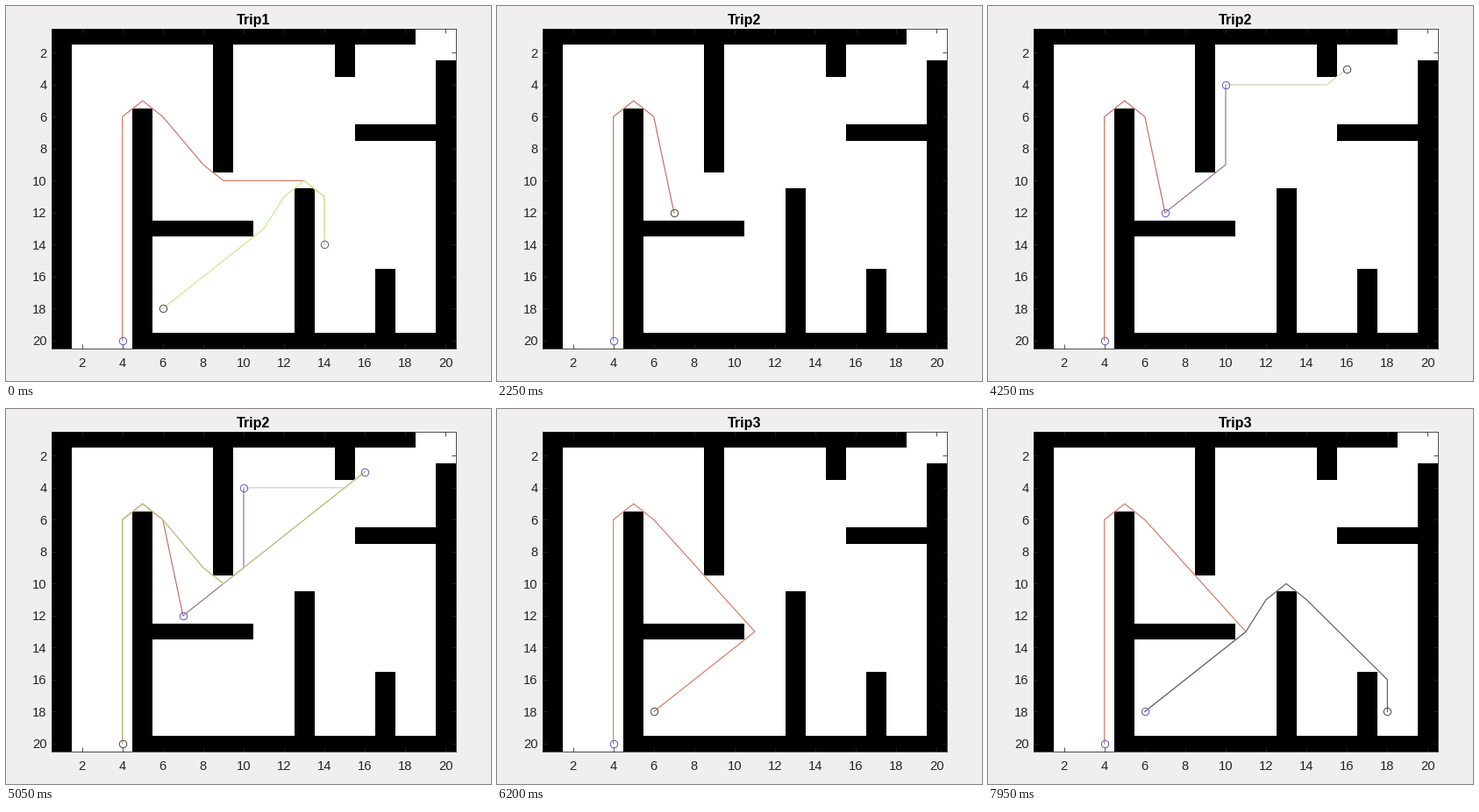
These frames come from a looping animation (553 by 428 pixels, 8 s). A matplotlib script:

```python
import numpy as np
import matplotlib.pyplot as plt
from matplotlib.animation import FuncAnimation
from matplotlib.patheffects import withStroke

W, H, DPI = 553, 428, 64
PX = 72 / DPI                 # points per pixel
FRAME_MS, LOOP_MS = 50, 8000
N = 20
INK, BLUE, BLACK = "#262626", "#5c5cc4", "#484848"

plt.rcParams["font.family"] = "Liberation Sans"

# Walls: row or column number -> first and last cell
ROWS = {1: (1, 18), 7: (16, 20), 13: (5, 10), 20: (5, 20)}
COLUMNS = {1: (1, 20), 5: (6, 20), 9: (1, 9), 13: (11, 20),
           15: (1, 3), 17: (16, 20), 20: (3, 20)}

BASE = (4, 20)
TRIPS = [
    [BASE, (14, 14), (6, 18), BASE],
    [BASE, (7, 12), (10, 4), (16, 3), BASE],
    [BASE, (6, 18), (18, 18)],
]
STARTS = [0, 0, 750, 1600, 2450, 3350, 5050, 5900, 7100]   # ms, one per leg
COLORS = ["#d0705f", "#c6ea8c", "#64bbb5", "#c86a5a", "#946a90",
          "#d8ccb4", "#b8b06c", "#dc7462", "#55586c"]


def build_walls():
    grid = np.zeros((N, N), bool)
    for row, (a, b) in ROWS.items():
        grid[row - 1, a - 1:b] = True
    for col, (a, b) in COLUMNS.items():
        grid[a - 1:b, col - 1] = True
    return grid


def cells(mask):
    return np.argwhere(mask)[:, ::-1] + 1.0


def step_costs(free, walls):
    """Straight-line distances between free cells, infinite through a wall."""
    half = 0.5 - 1e-6         # a line may graze a corner
    costs = []
    for p in free:
        d = free - p
        length = np.hypot(*d.T)
        d = np.where(d == 0, 1e-12, d)[:, None]
        t1, t2 = (walls - half - p) / d, (walls + half - p) / d
        enter = np.minimum(t1, t2).max(axis=2)
        leave = np.maximum(t1, t2).min(axis=2)
        hit = np.maximum(enter, 0) < np.minimum(leave, 1)
        costs.append(np.where(hit.any(axis=1), np.inf, length + 1e-6))
    return np.array(costs)


def shortest(start, goal):
    """Dijkstra over all free cells that see each other."""
    index = {tuple(c): i for i, c in enumerate(free)}
    src, node = index[start], index[goal]
    dist = np.full(len(free), np.inf)
    dist[src] = 0
    prev = np.full(len(free), src)
    todo = np.ones(len(free), bool)
    while todo[node]:
        i = np.argmin(np.where(todo, dist, np.inf))
        todo[i] = False
        better = dist[i] + costs[i] < dist
        dist[better] = dist[i] + costs[i][better]
        prev[better] = i
    route = [node]
    while route[-1] != src:
        route.append(prev[route[-1]])
    return free[route[::-1]]


grid = build_walls()
free = cells(~grid)
costs = step_costs(free, cells(grid))

fig = plt.figure(figsize=(W / DPI, H / DPI), dpi=DPI, facecolor="#f0eeef")
left, right, top, bottom = 52, 513, 26, 391
ax = fig.add_axes([left / W, 1 - bottom / H, (right - left) / W, (bottom - top) / H])
ax.imshow(~grid, cmap="gray", vmin=0, vmax=1, interpolation="nearest", aspect="auto",
          extent=(0.5, N + 0.5, N + 0.5, 0.5))
ax.set_xticks(range(2, N + 1, 2))
ax.set_yticks(range(2, N + 1, 2))
ax.set_axisbelow(False)
ax.tick_params(direction="in", top=True, right=True, length=4.6 * PX, width=0.8 * PX,
               color=INK, labelcolor=INK, labelsize=14.7 * PX)
ax.tick_params(axis="x", pad=10 * PX)
ax.tick_params(axis="y", pad=5.5 * PX)
for spine in ax.spines.values():
    spine.set(color=INK, linewidth=0.8 * PX)

title = fig.text((left + right) / 2 / W, 1 - 21 / H, "", ha="center", va="baseline",
                 fontsize=16.1 * PX, fontweight="bold", color="black")


def ring(color):
    return ax.plot([], [], "o", ms=8.4 * PX, mfc="none", mec=color, mew=PX,
                   snap=False, zorder=4)[0]


# Each leg: trip number, start stop, end stop
legs = [(n, a, b) for n, stops in enumerate(TRIPS, 1)
        for a, b in zip(stops, stops[1:])]
paths = []
for (_, a, b), color in zip(legs, COLORS):
    line, = ax.plot(*shortest(a, b).T, color=color, lw=1.15 * PX, zorder=3)
    # the white edge hides older lines underneath
    line.set_path_effects([withStroke(linewidth=1.2 * PX, foreground="white")])
    paths.append(line)
visited, current = ring(BLUE), ring(BLACK)


def update(frame):
    done = sum(start <= frame * FRAME_MS for start in STARTS)
    trip, _, end = legs[done - 1]
    stops = []
    for i, (path, (number, a, _)) in enumerate(zip(paths, legs)):
        shown = number == trip and i < done
        path.set_visible(shown)
        if shown and a != end:
            stops.append(a)
    title.set_text(f"Trip{trip}")
    visited.set_data(*zip(*stops))
    current.set_data([end[0]], [end[1]])
    return [*paths, visited, current, title]


anim = FuncAnimation(fig, update, frames=LOOP_MS // FRAME_MS, interval=FRAME_MS,
                     repeat=True, repeat_delay=0, blit=False)
plt.show()
```
